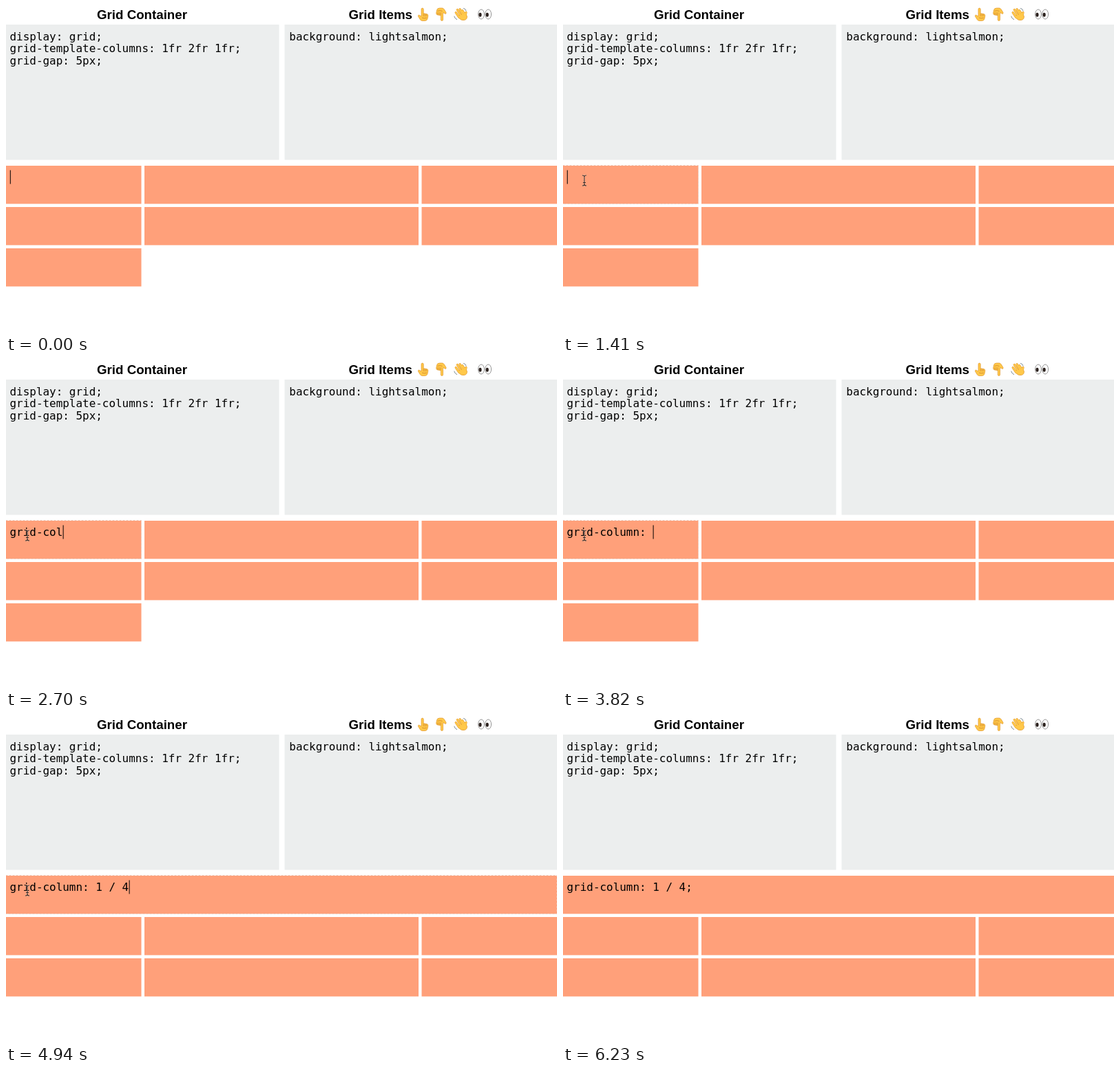
Animation, 800 px wide and 475 px high, one loop 8700 ms. Source, as an HTML page:

```html
<!DOCTYPE html>
<html lang="en">
<head>
<meta charset="utf-8">
<title>Grid column</title>
<style>
html, body { margin: 0; width: 100%; height: 100%; overflow: hidden; background: #fff; }
svg { display: block; width: 100vw; height: 100vh; }
.head { font: bold 18.72px "Liberation Sans", Arial, sans-serif; }
.code { font: 15.95px "DejaVu Sans Mono", monospace; white-space: pre; }
.panel { fill: #eceeee; }
.cell { fill: #ffa07a; }
</style>
</head>
<body>
<svg viewBox="0 0 800 475">
  <defs>
    <g id="point">
      <path d="M5 9V2.2Q5 .6 6.6 .6T8.2 2.2V8.2L13.5 9.2Q15 9.8 14.8 12L14 16Q13.4 19 10 19H6.2Q4.4 19 3.2 17L.6 12.8Q-.2 11 1.4 10.6L5 12.4Z" fill="#ffc84a" stroke="#e0962c" stroke-width=".7"/>
      <path d="M8.2 8.5v4.2M10.5 9v3.8M12.7 9.4v3.2M6 14.5q3 1.6 7 .2" fill="none" stroke="#cf8427" stroke-width=".8"/>
    </g>
    <g id="eye">
      <ellipse rx="4.4" ry="7" fill="#fff" stroke="#8b8b8b" stroke-width=".9"/>
      <ellipse cx="-1.5" cy=".8" rx="2.1" ry="3" fill="#2b211d"/>
    </g>
  </defs>

  <text class="head" x="197.5" y="18.5" text-anchor="middle">Grid Container</text>
  <text class="head" x="497.5" y="18.5">Grid Items</text>

  <use href="#point" x="598" y="2.5"/>
  <use href="#point" transform="translate(639.5 22) rotate(180)"/>
  <g fill="none" stroke-linecap="round">
    <path d="M658 16.5L653.2 9.6M660.5 14L655.3 5.5M663.3 12.5L659 4.8M666 12L662.6 6.6M666.5 15L668 9.5" stroke="#e0962c" stroke-width="3.2"/>
    <path d="M656 14.5L666 10.5L669.4 14.5Q670 19.5 665.5 20.5Q661 21.5 658 18Z" fill="#ffc84a" stroke="#e0962c" stroke-width=".7"/>
    <path d="M658 16.5L653.2 9.6M660.5 14L655.3 5.5M663.3 12.5L659 4.8M666 12L662.6 6.6M666.5 15L668 9.5" stroke="#ffc84a" stroke-width="2.3"/>
    <path d="M664.5 3.4q3 .8 3.6 3.6M650.8 15q.8 3.4 3.8 4.6" stroke="#7b8a94" stroke-width="1"/>
  </g>
  <use href="#eye" x="690" y="12"/>
  <use href="#eye" x="700.2" y="12"/>

  <rect class="panel" y="27" width="396.5" height="196.5"/>
  <rect class="panel" x="404.5" y="27" width="395.5" height="196.5"/>
  <g class="code">
    <text x="5.5" y="49.5">display: grid;</text>
    <text x="5.5" y="67.3">grid-template-columns: 1fr 2fr 1fr;</text>
    <text x="5.5" y="85.2">grid-gap: 5px;</text>
    <text x="411.3" y="49.5">background: lightsalmon;</text>
  </g>

  <g id="cells"></g>
  <rect id="outline" fill="none" stroke="#ecd0c4" stroke-dasharray="3 2"/>
  <text id="typed" class="code" x="5.5" y="254.3"></text>
  <rect id="caret" y="238.5" width="1" height="20"/>
  <path id="arrow" d="M0 0V14.2L3.2 11.2L5.6 16.6L8.2 15.5L5.8 10.3H10.2Z" fill="#000" stroke="#fff" stroke-width="1" stroke-linejoin="round"/>
  <g id="beam" fill="none">
    <path d="M-3 -7.5Q0 -7.5 0 -5.5Q0 -7.5 3 -7.5M0 -5.5V5.5M-3 7.5Q0 7.5 0 5.5Q0 7.5 3 7.5M-2 3H2" stroke="#ffd6c4" stroke-width="2.2" opacity=".6"/>
    <path d="M-3 -7.5Q0 -7.5 0 -5.5Q0 -7.5 3 -7.5M0 -5.5V5.5M-3 7.5Q0 7.5 0 5.5Q0 7.5 3 7.5M-2 3H2" stroke="#3a2a24" stroke-width="1.1"/>
  </g>
</svg>
<script>
const LOOP = 8700, ADVANCE = 9.6, SPAN_AT = 4940;
const LINE = "grid-column: 1 / 4;";
// one time per typed character
const KEYS = [1650, 1880, 2000, 2110, 2230, 2410, 2530, 2700, 2940, 3120,
  3230, 3530, 3820, 4180, 4410, 4650, 4760, 4940, 5120];
const CARET_ON = [[0, 290], [700, 1050], [1410, 5470], [5880, 6230]];
const COLS = [[0, 196.5], [201, 398], [603.5, 196.5]];
const ROWS = [232, 292, 352];
const ROW_H = 55.4;
// pointer path: time, x, y
const PATH = [[530, 6, 227], [650, 32.5, 224], [760, 36, 238], [880, 33, 249], [1060, 31, 253.5]];

const $ = id => document.getElementById(id);
const show = (el, on) => el.setAttribute("visibility", on ? "visible" : "hidden");
const put = (el, attrs) => { for (const k in attrs) el.setAttribute(k, attrs[k]); };

function layout(wide) {
  const cells = [];
  if (wide) cells.push([0, 800, ROWS[0]]);
  for (let i = wide ? 3 : 0; cells.length < 7; i++)
    cells.push([...COLS[i % 3], ROWS[Math.floor(i / 3)]]);
  return cells;
}

function pointerAt(t) {
  if (t < 530 || t >= 6000) return null;
  if (t >= 5940) return [42, 385];
  if (t >= 5880) return [37, 316];
  const q = Math.min(1060, 530 + Math.floor((t - 530) / 58.8 + 0.01) * 58.9);
  const i = Math.max(1, PATH.findIndex(p => p[0] >= q));
  const [t0, x0, y0] = PATH[i - 1], [t1, x1, y1] = PATH[i];
  const k = (q - t0) / (t1 - t0);
  return [x0 + (x1 - x0) * k, y0 + (y1 - y0) * k];
}

let drawnWide = null;
function draw(t) {
  const wide = t >= SPAN_AT, cells = layout(wide);
  if (wide !== drawnWide) {
    $("cells").innerHTML = cells.map(([x, w, y]) =>
      `<rect class="cell" x="${x}" y="${y}" width="${w}" height="${ROW_H}"/>`).join("");
    drawnWide = wide;
  }

  const count = KEYS.filter(k => k <= t).length;
  $("typed").textContent = LINE.slice(0, count);
  put($("caret"), { x: 5.8 + count * ADVANCE });
  show($("caret"), CARET_ON.some(([a, b]) => t >= a && t < b));

  const p = pointerAt(t);
  const hit = p && cells.find(([x, w, y]) =>
    p[0] >= x && p[0] < x + w && p[1] >= y && p[1] < y + ROW_H);
  show($("arrow"), p && !hit);
  show($("beam"), hit);
  show($("outline"), hit);
  if (p) put($(hit ? "beam" : "arrow"), { transform: `translate(${p[0]} ${p[1]})` });
  if (hit) put($("outline"), { x: hit[0] - 0.5, y: hit[2] - 0.5, width: hit[1] + 0.5, height: ROW_H + 0.6 });
}

const start = performance.now();
function tick() {
  draw((performance.now() - start) % LOOP);
  requestAnimationFrame(tick);
}
tick();
</script>
</body>
</html>
```
